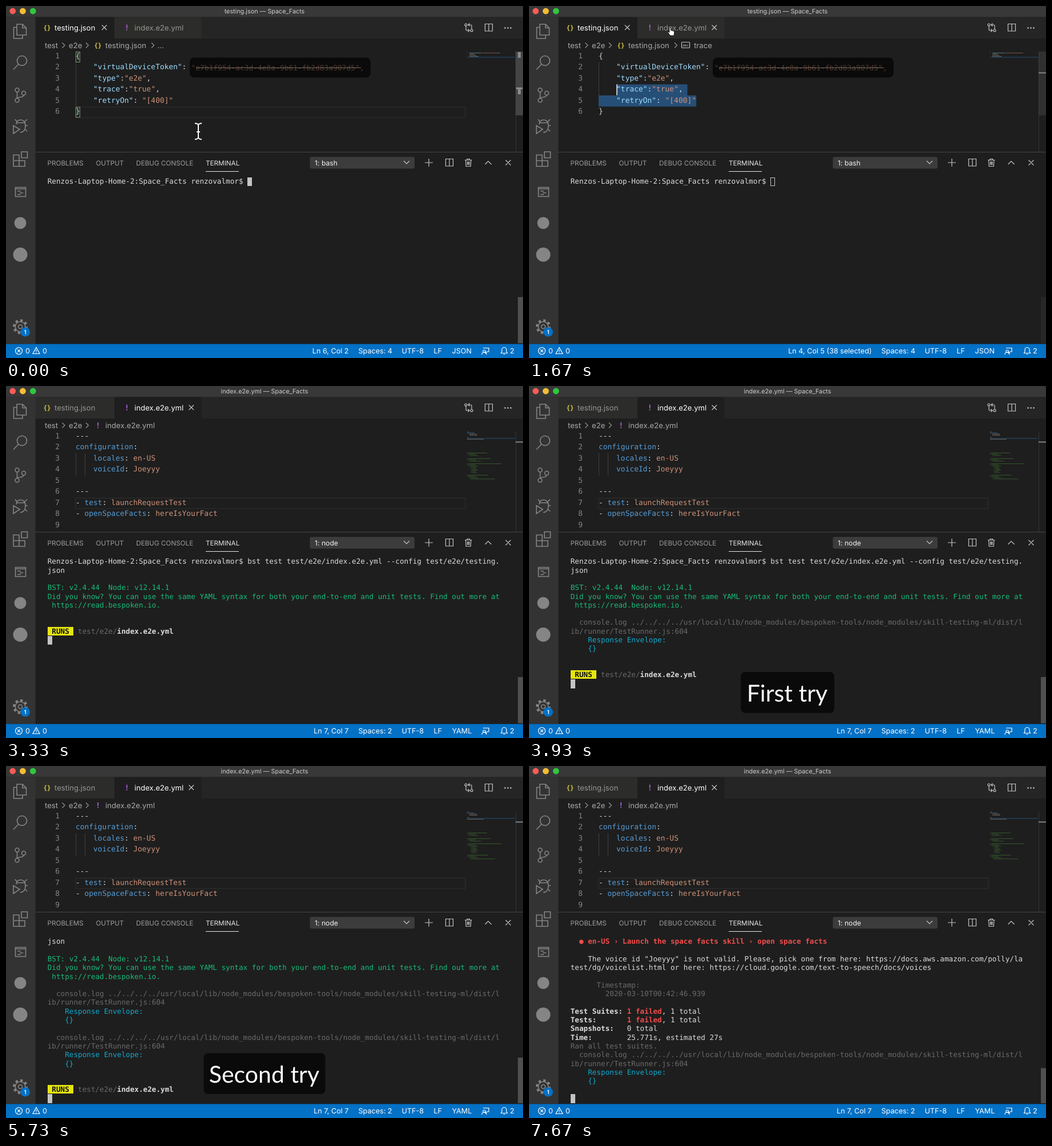
An HTML page for the animation above (8000 ms loop, 906 by 618 pixels).

```html
<!DOCTYPE html>
<html lang="en">
<head>
<meta charset="utf-8">
<title>Editor session</title>
<style>
html, body { margin: 0; width: 100%; height: 100%; overflow: hidden; background: #1e1e1e; }
body { text-rendering: geometricPrecision; }
svg { position: absolute; left: 0; top: 0; }
text { font-family: Inter, sans-serif; }
pre { position: absolute; margin: 0; font-family: "DejaVu Sans Mono", monospace; color: #d4d4d4; }
.code { left: 122px; top: 79px; font-size: 12.92px; line-height: 19.45px; }
.nums { left: 64px; width: 30px; text-align: right; color: #858585; }
#term { left: 72.7px; top: 300.4px; font-size: 12.67px; line-height: 15.29px; color: #dcdcdc; }
.json .yml-only, .yml .json-only { display: none; }
.mono { font: 12.92px "DejaVu Sans Mono", monospace; }
.tab { font-size: 13.1px; }
.crumb { font-size: 13.2px; fill: #a9a9a9; }
.panel { font-size: 11.7px; fill: #9d9d9d; }
.status { font-size: 12.6px; fill: #fff; }
.braces { font: bold 11px "DejaVu Sans Mono", monospace; fill: #d6c341; }
.bang { font: bold 14px "DejaVu Sans Mono", monospace; fill: #a65fd0; }
.line { fill: none; stroke: #c5c5c5; stroke-width: 1.2; }
.side { fill: none; stroke: #858585; stroke-width: 1.6; }
.key { color: #9cdcfe; } .str { color: #ce9178; } .name { color: #569cd6; }
.green { color: #17bb79; } .dim { color: #6a6a6a; } .cyan { color: #11a8cd; }
.red { color: #f14c4c; font-weight: bold; }
.runs { background: #e5e510; color: #111; font-weight: bold; }
.cursor { position: absolute; width: 8px; height: 15.5px; margin-top: .5px; box-sizing: border-box; border: 1px solid #c4c4c4; }
.focus .cursor { background: #c4c4c4; }
</style>
</head>
<body class="json">
<svg width="906" height="618" viewBox="0 0 906 618">
  <rect width="906" height="618" fill="#1e1e1e"/>
  <rect width="906" height="19.5" fill="#383838"/>
  <circle cx="11.7" cy="9" r="5.4" fill="#fc5b57"/>
  <circle cx="29.4" cy="9" r="5.4" fill="#f5bd36"/>
  <circle cx="47.3" cy="9" r="5.4" fill="#30c740"/>
  <g font-size="10.8" fill="#cfcfcf" text-anchor="middle">
    <text class="json-only" x="453" y="13">testing.json — Space_Facts</text>
    <text class="yml-only" x="453" y="13">index.e2e.yml — Space_Facts</text>
  </g>

  <!-- tabs -->
  <rect x="51" y="19.5" width="855" height="37.5" fill="#252526"/>
  <rect class="json-only" x="51" y="19.5" width="139" height="38" fill="#1e1e1e"/>
  <rect class="json-only" x="190" y="19.5" width="152.5" height="37.5" fill="#2c2d2a"/>
  <rect class="yml-only" x="51" y="19.5" width="139" height="37.5" fill="#2c2d2a"/>
  <rect class="yml-only" x="190" y="19.5" width="152.5" height="38" fill="#1e1e1e"/>
  <text class="braces" x="65.5" y="41.5">{}</text>
  <text class="bang" x="207.5" y="43">!</text>
  <g class="json-only">
    <text class="tab" x="85" y="43" fill="#fff">testing.json</text>
    <text class="tab" x="225" y="43" fill="#969696">index.e2e.yml</text>
    <path class="line" d="M168 33.5l8.500 8.500m0-8.500l-8.500 8.500"/>
  </g>
  <g class="yml-only">
    <text class="tab" x="85" y="43" fill="#969696">testing.json</text>
    <text class="tab" x="225" y="43" fill="#fff">index.e2e.yml</text>
  </g>
  <path id="close" class="line" d="M320.500 33.500l8.500 8.500m0-8.500l-8.500 8.500"/>
  <g class="line">
    <circle cx="806" cy="33" r="2"/><circle cx="816" cy="43" r="2"/>
    <path d="M806 35v6q0 2 2 2h4m-2.500-2.500l2.500 2.500-2.500 2.500M816 41v-6q0-2-2-2h-4m2.500-2.500l-2.500 2.500 2.500 2.500"/>
    <path d="M839.500 31.500h13v12.500h-13zM846 31.500v12.500"/>
  </g>
  <g fill="#c5c5c5"><circle cx="874.500" cy="38.500" r="1.300"/><circle cx="879.500" cy="38.500" r="1.300"/><circle cx="884.500" cy="38.500" r="1.300"/></g>

  <!-- breadcrumbs -->
  <text class="crumb" x="68" y="73.500">test</text>
  <text class="crumb" x="110" y="73.500">e2e</text>
  <path class="line" stroke-opacity=".7" d="M98.500 64.500l4.500 4.500-4.500 4.500M140 64.500l4.500 4.500-4.500 4.500"/>
  <g class="json-only">
    <text class="braces" x="154.500" y="72.500">{}</text>
    <text class="crumb" x="174" y="73.500">testing.json</text>
    <path class="line" stroke-opacity=".7" d="M255 64.500l4.500 4.500-4.500 4.500"/>
    <g id="symbol"><rect class="line" x="267.500" y="63.500" width="14" height="10" rx="1"/>
      <text x="274.500" y="71" font-size="6" fill="#c5c5c5" text-anchor="middle">abc</text></g>
    <text id="crumb" class="crumb" y="73.500"></text>
  </g>
  <g class="yml-only">
    <text class="bang" x="157" y="74">!</text>
    <text class="crumb" x="174" y="73.500">index.e2e.yml</text>
  </g>

  <!-- editor decorations -->
  <g fill="none" stroke="#404040">
    <path class="json-only" d="M122.500 98.500V176.500"/>
    <path class="yml-only" d="M122.500 118V157M138.500 118V157"/>
  </g>
  <rect id="current" x="122" width="683" height="18.500" fill="none" stroke="#2b2b2b" stroke-width="1.400"/>
  <g id="brackets" fill="#1b2a1b" stroke="#888">
    <rect x="122.500" y="80.500" width="7" height="18"/><rect x="122.500" y="177.500" width="7" height="18"/>
  </g>
  <rect id="sel4" height="19.500" fill="#264f78"/>
  <rect id="sel5" height="19.500" fill="#264f78"/>
  <rect id="caret" width="1.800" height="19" fill="#d0d0d0"/>

  <!-- minimap and ruler -->
  <g id="minimap"></g>
  <path d="M893.500 80V256" stroke="#343434"/>
  <rect id="slider" class="json-only" x="893" y="80" width="13" height="112" fill="#505050"/>
  <path id="marks" d="M897 81h5v10h-5zM894 143h11v3h-3v9h-5v-9h-3z" fill="#8a8a8a"/>
  <rect id="mark" x="893" width="13" height="1.800" fill="#8c8c8c"/>

  <!-- panel -->
  <path d="M51 256.500H906" stroke="#474747"/>
  <text class="panel" x="72.500" y="280">PROBLEMS</text>
  <text class="panel" x="157.500" y="280">OUTPUT</text>
  <text class="panel" x="228" y="280">DEBUG CONSOLE</text>
  <text class="panel" x="350" y="280" style="fill:#e7e7e7">TERMINAL</text>
  <path d="M350 290.500H408" stroke="#e7e7e7"/>
  <rect x="532.500" y="265" width="183.500" height="20.500" rx="3" fill="#3c3c3c"/>
  <text id="shell" x="541" y="280" font-size="12.200" fill="#f0f0f0"></text>
  <g class="line">
    <path d="M697 272l5 5 5-5M734 275h14M741 268v14M770.500 268.500h13v12.500h-13zM777 268.500v12.500M839.500 278l5.500-5.500 5.500 5.500M875.500 270.500l9 9m0-9l-9 9"/>
    <path d="M804 270.500h12.500M808 270.500v-2h4.500v2M805.500 270.500l.7 11h8l.7-11M808.500 273v6M810.300 273v6M812 273v6"/>
  </g>
  <rect id="scroll" x="897" width="9" fill="#4f4f4f"/>

  <!-- activity bar -->
  <rect y="19.500" width="51.500" height="574" fill="#333"/>
  <g class="side">
    <path d="M19 32h10l6.500 6.500V51H19zM29 32v6.500h6.500M19 37.500h-5.500V57H29V51"/>
    <circle cx="28" cy="96" r="8.500"/><path d="M22 102l-9 9.500"/>
    <circle cx="19.500" cy="147.500" r="3.500"/><circle cx="19.500" cy="165.500" r="3.500"/><circle cx="31" cy="153" r="3.500"/>
    <path d="M19.500 151v11M31 156.500c0 5-10 2-11.500 6"/>
    <path d="M18 208c0-6 4-8 8-8s8 3 8 10-3 12-9 12M19 205h14M33 210h5M33 216l4 4M33 203l4-4M19 203l-3-4M13 210l11 6.500L13 224z"/>
    <path d="M13 261.500h10v20H13zM13 271.500h20v10H23M33 271.500v10H23M27 256h10.500v10.500H27z"/>
    <path d="M16.500 318.500h18v16h-18zM16.500 321h18M20 325h6M24 328h6M20 331h6"/>
    <circle cx="25" cy="563" r="8.800"/><circle cx="25" cy="563" r="3.500"/>
    <circle cx="25" cy="563" r="11" stroke-width="4" pathLength="16" stroke-dasharray="1 1"/>
  </g>
  <g fill="#858585"><circle cx="25" cy="381" r="10.500"/><circle cx="25" cy="436.500" r="12.500"/></g>
  <circle cx="33.700" cy="572.300" r="8.300" fill="#0371c6"/>
  <text x="33.500" y="575.800" font-size="9.800" font-weight="600" fill="#fff" text-anchor="middle">1</text>

  <!-- status bar -->
  <rect y="593.500" width="906" height="24.500" fill="#0371c6"/>
  <g class="line" style="stroke:#fff">
    <circle cx="22.500" cy="605.500" r="6"/><path d="M20 603l5 5m0-5l-5 5M53 599.500l6 11H47zM53 603.500v3.500M53 608v1.200"/>
    <path d="M836 600.500h10v6.500h-3l-2.500 2.500V607M838 604a2.200 2.200 0 1 0 .1 0M834 612q0-4 4-4t4 4"/>
    <path d="M867.500 609.500h11l-1.500-2.500v-3.500a4 4 0 0 0-8 0v3.500zM871.500 611.500h3"/>
  </g>
  <text class="status" x="34" y="610">0</text>
  <text class="status" x="64" y="610">0</text>
  <text id="pos" class="status" x="600.500" y="610" text-anchor="end"></text>
  <text class="status json-only" x="617.500" y="610">Spaces: 4</text>
  <text class="status yml-only" x="617.500" y="610">Spaces: 2</text>
  <text class="status" x="693.500" y="610">UTF-8</text>
  <text class="status" x="749.500" y="610">LF</text>
  <text class="status json-only" x="781.500" y="610">JSON</text>
  <text class="status yml-only" x="781.500" y="610">YAML</text>
  <text class="status" x="883" y="610">2</text>
</svg>

<pre class="code nums json-only">1
2
3
4
5
6</pre>
<pre class="code nums yml-only">1
2
3
4
5
6
7
8
9</pre>
<pre class="code json-only">{
    <span class="key">"virtualDeviceToken"</span>:
    <span class="key">"type"</span>:<span class="str">"e2e"</span>,
    <span class="key">"trace"</span>:<span class="str">"true"</span>,
    <span class="key">"retryOn"</span>: <span class="str">"[400]"</span>
}</pre>
<pre class="code yml-only">---
<span class="name">configuration</span>:
    <span class="name">locales</span>: <span class="str">en-US</span>
    <span class="name">voiceId</span>: <span class="str">Joeyyy</span>

---
- <span class="name">test</span>: <span class="str">launchRequestTest</span>
- <span class="name">openSpaceFacts</span>: <span class="str">hereIsYourFact</span></pre>
<pre id="term"></pre>

<svg width="906" height="618" viewBox="0 0 906 618">
  <g class="json-only">
    <rect x="322" y="90.500" width="317" height="35" rx="8" fill="#0a0a0a"/>
    <text class="mono" x="324.500" y="113" fill="#4d382d">"e7b1f954-ac3d-4e8a-9b61-fb2d83a907d5",</text>
    <path d="M333 108.500H622" stroke="#7c6a60"/>
  </g>
  <g id="label">
    <rect height="72" rx="8" fill="#0a0a0a"/>
    <text x="452.500" text-anchor="middle" fill="#fff" style="font:41px Lato,sans-serif"></text>
  </g>
  <g id="mouse">
    <path id="beam" d="M-6-14q5 0 6 3 1-3 6-3M0-11V11M-6 14q5 0 6-3 1 3 6 3M-3 1H3" fill="none" stroke="#fff" stroke-width="2"/>
    <path id="hand" d="M-3-6.500q1.500-1.500 2.500 0v4l5 1.500q1.500.5 1.300 2.500L5 7H-1.500L-5.500 1.500q0-1.500 1.500-1l1 1z" fill="#fff" stroke="#111"/>
  </g>
</svg>

<script>
const LOOP = 8000, FPS = 15;
const COL = 7.78, ROW = 19.45, LEFT = 122, TOP = 79.2;
const $ = id => document.getElementById(id);
const set = (el, attrs) => { for (const a in attrs) el.setAttribute(a, attrs[a]); };
const show = (el, on) => { el.style.display = on ? '' : 'none'; };
const span = (cls, text) => `<span class="${cls}">${text}</span>`;
const colX = col => LEFT + (col - 1) * COL;
const lineY = line => TOP + (line - 1) * ROW;
const latest = (track, time) => track.filter(step => step[0] <= time).pop();

// Terminal contents
const prompt = 'Renzos-Laptop-Home-2:Space_Facts renzovalmor$ ';
const command = [prompt + 'bst test test/e2e/index.e2e.yml --config test/e2e/testing.', 'json'];
const intro = ['', span('green', 'BST: v2.4.44  Node: v12.14.1'),
  span('green', 'Did you know? You can use the same YAML syntax for both your end-to-end and unit tests. Find out more at'),
  span('green', ' https://read.bespoken.io.'), ''];
const log = [
  span('dim', '  console.log ../../../../usr/local/lib/node_modules/bespoken-tools/node_modules/skill-testing-ml/dist/l'),
  span('dim', 'ib/runner/TestRunner.js:604'),
  span('cyan', '    Response Envelope:'), span('cyan', '    {}'), ''];
const runs = ['', span('runs', ' RUNS ') + span('dim', ' test/e2e/') + '<b>index.e2e.yml</b>', ''];
const failed = span('red', '1 failed') + ', 1 total';
const report = [
  span('red', '  ● en-US › Launch the space facts skill › open space facts'), '',
  '    The voice id "Joeyyy" is not valid. Please, pick one from here: https://docs.aws.amazon.com/polly/la',
  'test/dg/voicelist.html or here: https://cloud.google.com/text-to-speech/docs/voices', '',
  span('dim', '      Timestamp:'), span('dim', '        2020-03-10T00:42:46.939'), '',
  '<b>Test Suites:</b> ' + failed, '<b>Tests:</b>       ' + failed,
  '<b>Snapshots:</b>   0 total', '<b>Time:</b>        25.771s, estimated 27s',
  span('dim', 'Ran all test suites.')];
const started = [...command, ...intro];
const screens = [
  [0, [prompt]],
  [2530, [...command, '']],
  [2670, [...command, ...intro.slice(0, 2), '']],
  [2730, [...started, '']],
  [3070, [...started, ...runs]],
  [3930, [...started, ...log, ...runs]],
  [5600, [...started, ...log, ...log, ...runs]],
  [7600, [...report, ...log, '']]
];
const VISIBLE_ROWS = 19;

// time, line and column of the moving end of the selection
const drag = [[0, 6, 2], [330, 5, 23], [400, 5, 21], [470, 5, 19], [530, 5, 15], [600, 5, 10],
  [670, 5, 6], [730, 5, 3], [800, 5, 1], [930, 4, 1], [1000, 4, 3], [1070, 4, 4], [1130, 4, 5]];
// time, x, y
const path = [[0, 337, 220], [70, 324, 190], [130, 321, 178], [330, 321, 178], [470, 244, 176],
  [800, 108, 168], [1130, 152, 144], [1330, 112, 102], [1400, 112, 102], [1670, 249, 45],
  [1800, 249, 45], [2330, 290, 451], [LOOP, 290, 451]];
// time, text, box x, y, width
const labels = [[0, '', 0, 0, 0], [3600, 'First try', 371, 502, 164],
  [5730, 'Second try', 346.5, 504, 213], [7600, '', 0, 0, 0]];

function buildMinimap() {
  const bar = (x, y, w, color) => `<rect x="${x}" y="${y}" width="${w}" height="1" fill="${color}"/>`;
  const json = [bar(808, 81, 1, '#666'), bar(812, 82, 22, '#54788a'), bar(835, 82, 31, '#7a5646'),
    bar(812, 84, 9, '#65685f'), bar(812, 86, 12, '#65685f'), bar(812, 88, 16, '#65685f'),
    bar(808, 89.5, 84, '#20517c')];
  const yml = [bar(808, 80, 3, '#555'), bar(808, 82, 13, '#37628a'), bar(812, 84, 13, '#6c6058'),
    bar(812, 86, 14, '#6c6058'), bar(808, 90, 3, '#555'), bar(808, 91.5, 84, '#20517c'),
    bar(808, 93, 29, '#6c6058')];
  const comment = (x, y, w) => yml.push(bar(x, y, 1, '#3f6a33'), bar(x + 2, y, w - 2, '#35572c'));
  [[117, 35], [127, 41], [136, 60], [156, 37]].forEach(([y, w]) => {
    comment(808, y, w);
    comment(808, y + 2.2, 15);
    comment(812, y + 4.4, y === 127 ? 20 : 15);
  });
  for (let i = 0; i < 5; i++) comment(815, 142.6 + i * 2.2, 8 + i % 3 * 2);
  comment(813, 162.6, 44);
  $('minimap').innerHTML = `<g class="json-only">${json.join('')}</g><g class="yml-only">${yml.join('')}</g>`;
}

function drawEditor(time) {
  const json = time < 1730;
  const [, line, col] = latest(drag, time);
  const selecting = json && time >= 330;
  const count = line === 5 ? 23 - col : 43 - col;
  document.body.className = json ? 'json' : 'yml';
  show($('close'), !json || time >= 1600);
  $('pos').textContent = !json ? 'Ln 7, Col 7'
    : `Ln ${line}, Col ${col}` + (selecting && count ? ` (${count} selected)` : '');
  $('crumb').textContent = selecting ? (line === 5 ? 'retryOn' : 'trace') : '...';
  set($('crumb'), { x: selecting ? 289 : 265.5 });
  show($('symbol'), selecting);
  show($('brackets'), time < 530);
  show($('marks'), time < 330);
  show($('current'), !selecting || !count);
  set($('current'), { y: lineY(json ? line : 7) + .8 });

  show($('sel4'), selecting && line === 4);
  set($('sel4'), { x: colX(col), y: lineY(4), width: colX(21) - colX(col) });
  show($('sel5'), selecting);
  const from = line === 5 ? col : 1;
  set($('sel5'), { x: colX(from), y: lineY(5), width: colX(23) - colX(from) });
  show($('caret'), time >= 330 && time < 2330);
  set($('caret'), { x: colX(json ? col : 7), y: lineY(json ? line : 7) });

  show($('mark'), time >= 330);
  set($('mark'), { y: !json ? 97.5 : line === 5 ? 128.5 : 116.5 });
  $('slider').style.opacity = time < 1470 ? .75 : .35;
}

function drawTerminal(time) {
  const [, lines] = latest(screens, time);
  const focused = time < 330 || time >= 2330;
  $('term').className = focused ? 'focus' : '';
  $('term').innerHTML = lines.slice(-VISIBLE_ROWS).join('\n') + '<i class="cursor"></i>';
  $('shell').textContent = time < 2600 ? '1: bash' : '1: node';
  const top = time < 5600 ? 511 : time < 7600 ? 512 : 530.5;
  set($('scroll'), { y: top, height: 592 - top });
  $('scroll').style.opacity = time < 330 || time >= 2130 ? 1 : .18;
}

function drawMouse(time) {
  const i = path.findIndex(p => p[0] > time);
  const [t0, x0, y0] = path[i - 1], [t1, x1, y1] = path[i];
  const f = (time - t0) / (t1 - t0);
  const x = x0 + (x1 - x0) * f, y = y0 + (y1 - y0) * f;
  set($('mouse'), { transform: `translate(${x} ${y})` });
  show($('mouse'), time < 2530);
  show($('hand'), y < 62);
  show($('beam'), y >= 62);
}

function drawLabel(time) {
  const [, text, x, y, width] = latest(labels, time);
  const [box, caption] = $('label').children;
  show($('label'), text);
  set(box, { x, y, width });
  set(caption, { y: y + 52 });
  caption.textContent = text;
}

const start = performance.now();
let lastTick = -1;
function frame() {
  const t = (performance.now() - start + 4) % LOOP;
  const tick = Math.floor(t * FPS / 1000);
  if (tick !== lastTick) {
    lastTick = tick;
    const time = Math.round(tick * 100 / FPS) * 10;
    drawEditor(time);
    drawTerminal(time);
    drawMouse(time);
    drawLabel(time);
  }
  requestAnimationFrame(frame);
}
buildMinimap();
frame();
</script>
</body>
</html>
```
